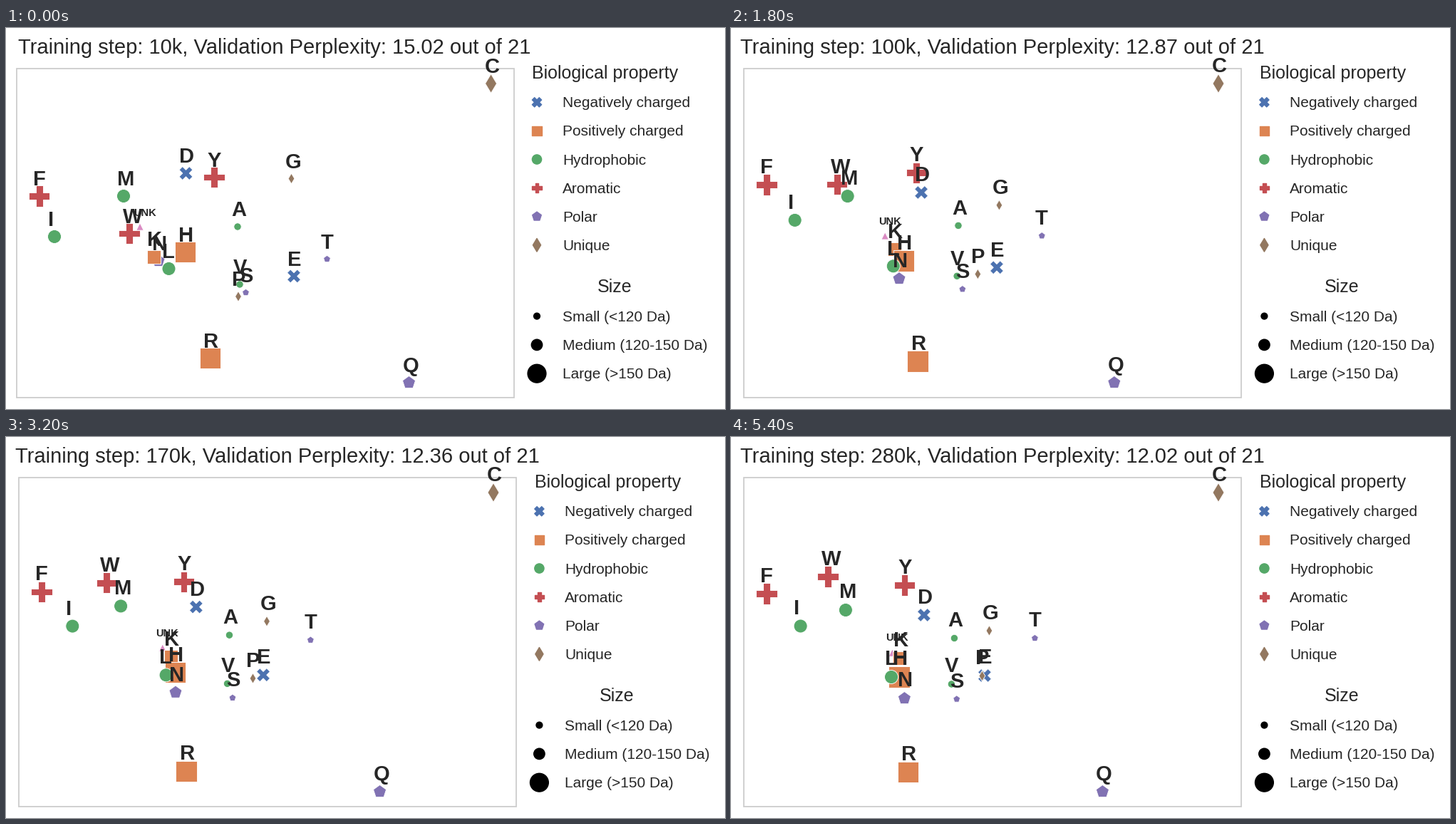
Write a matplotlib script that moves like this. It is 1009 px wide and 535 px high and loops after 5.6 s.

```python
import matplotlib.pyplot as plt
import numpy as np
from matplotlib.animation import FuncAnimation
from matplotlib.collections import PathCollection
from matplotlib.markers import MarkerStyle
from matplotlib.patches import Rectangle
from matplotlib.transforms import IdentityTransform

W, H, DPI = 1009, 535, 100
FRAMES, INTERVAL = 28, 200
PT = 72 / DPI
INK = "#262626"
SMALL, MEDIUM, LARGE = 10.4, 19, 29.2
LEFT, BOTTOM = 46.8, 498  # fixed edges of the point cloud
SHIFT = 3.4  # the layout moves right once the step count has three digits

PROPERTIES = {
    "Negatively charged": ("X", "#4C72B0"),
    "Positively charged": ("s", "#DD8452"),
    "Hydrophobic": ("o", "#55A868"),
    "Aromatic": ("P", "#C44E52"),
    "Polar": ("p", "#8172B3"),
    "Unique": ("d", "#937860"),
}
NEG, POS, HYDRO, AROM, POLAR, UNIQ = PROPERTIES.values()
UNKNOWN = ("^", "#DA8BC3")

# Name, style, size, first and last position; later rows are painted on top
ACIDS = [
    ("UNK", UNKNOWN, SMALL, (188, 279), (223, 303)),
    ("N", POLAR, MEDIUM, (214, 327), (240, 367)),
    ("S", POLAR, SMALL, (336.5, 371.5), (313.3, 368)),
    ("T", POLAR, SMALL, (450.5, 324.5), (423, 282.5)),
    ("Q", POLAR, MEDIUM, (565.5, 498), (518, 498)),
    ("D", NEG, MEDIUM, (252.5, 204), (267.5, 250)),
    ("E", NEG, MEDIUM, (404, 348.5), (352.5, 335)),
    ("K", POS, MEDIUM, (207, 321), (233.5, 310.5)),
    ("H", POS, LARGE, (251.5, 314.5), (232.5, 337)),
    ("R", POS, LARGE, (286.5, 463.5), (245, 470.7)),
    ("A", HYDRO, SMALL, (325, 279), (310, 282.5)),
    ("V", HYDRO, SMALL, (328, 360), (306, 347)),
    ("I", HYDRO, MEDIUM, (68, 293), (94.2, 265.5)),
    ("L", HYDRO, MEDIUM, (228.5, 338), (221.6, 337)),
    ("M", HYDRO, MEDIUM, (165, 236), (157.5, 243)),
    ("F", AROM, LARGE, (46.8, 236), (46.5, 220)),
    ("W", AROM, LARGE, (173, 288.5), (132.5, 196)),
    ("Y", AROM, LARGE, (292, 209.5), (240, 208)),
    ("C", UNIQ, MEDIUM, (680.6, 78), (680.6, 78)),
    ("G", UNIQ, SMALL, (400.5, 211.5), (359, 272)),
    ("P", UNIQ, SMALL, (326, 377), (349, 335.5)),
]
names, styles, sides, first, last = zip(*ACIDS)
first, last = np.array(first), np.array(last)
inner = np.array([n != "C" for n in names])  # C pins the far corner

plt.rcParams["font.family"] = "Liberation Sans"
fig = plt.figure(figsize=(W / DPI, H / DPI), dpi=DPI, facecolor="white")
ax = fig.add_axes([0, 0, 1, 1])
ax.set_xlim(0, W)
ax.set_ylim(H, 0)
ax.axis("off")


def along(step, steps, values):
    return np.interp(np.log(step), np.log(steps), values)


def perplexity(step):
    return along(step, [10, 40, 80, 120, 170, 230, 280],
                 [15.02, 13.75, 12.99, 12.78, 12.36, 12.15, 12.02])


def positions(step, u):
    """Drift with the log of the step, then rescale about the fixed edges."""
    pos = first + (last - first) * u
    sx = along(step, [10, 40, 80, 120, 280], [0, .022, .025, -.014, 0])
    sy = along(step, [10, 80, 120, 280], [0, .004, .03, 0])
    pos[inner] += (pos[inner] - (LEFT, BOTTOM)) * (sx, sy)
    return pos


def text(x, y, s, size, **kw):
    return ax.text(x, y, s, fontsize=size, color=INK, ha="left",
                   va="baseline", zorder=3, **kw)


def marker_set(styles, sides, edge, edge_width):
    shapes = [MarkerStyle(m) for m, _ in styles]
    paths = [s.get_path().transformed(s.get_transform()) for s in shapes]
    marks = PathCollection(
        paths, sizes=(np.array(sides) * PT) ** 2,
        facecolors=[c for _, c in styles], edgecolors=edge,
        linewidths=edge_width * PT, offsets=np.zeros((len(paths), 2)),
        offset_transform=ax.transData, zorder=1)
    marks.set_transform(IdentityTransform())
    ax.add_collection(marks, autolim=False)
    return marks


points = marker_set(styles, sides, "white", 0.9)
labels = [text(0, 0, n, 21 if len(n) == 1 else 10.5, weight="bold")
          for n in names]
box = ax.add_patch(Rectangle((15, 57), 698, 462, fill=False, ec="#cccccc",
                             lw=1.8 * PT, zorder=2))
title = text(0, 36, "", 21)

# Legend
size_names = ["Small (<120 Da)", "Medium (120-150 Da)", "Large (>150 Da)"]
key_styles = list(PROPERTIES.values()) + [("o", "black")] * 3
key_sides = [13.2] * 6 + [8.8, 15.4, 25.8]
key_y = np.append(104.3 + 40.1 * np.arange(6), 404.6 + 40.3 * np.arange(3))
keys = marker_set(key_styles, key_sides, "face", 1.4)
captions = [(text(0, y + 7, s, 15), 781)
            for s, y in zip([*PROPERTIES, *size_names], key_y)]
captions += [(text(0, 71, "Biological property", 18), 738.5),
             (text(0, 371, "Size", 18), 829.5)]


def draw(i):
    step = 10 * (i + 1)
    u = np.log(i + 1) / np.log(FRAMES)
    wide = step >= 100
    dx = SHIFT if wide else 0

    pos = positions(step, u) + (dx, 0)
    points.set_offsets(pos)
    rise = 14.9 + 1.6 * u ** 2
    for label, (x, y) in zip(labels, pos):
        label.set_position((x - 9.2, y - rise))

    title.set_x(13.4 if wide else 17.4)
    title.set_text(f"Training step: {step}k, Validation Perplexity: "
                   f"{perplexity(step):.2f} out of 21")
    box.set_x(15 + dx)
    keys.set_offsets([(745 + dx, y) for y in key_y])
    for caption, x in captions:
        caption.set_x(x + dx)
    return []


anim = FuncAnimation(fig, draw, frames=FRAMES, interval=INTERVAL,
                     repeat=True, repeat_delay=0, blit=False)
plt.show()
```
